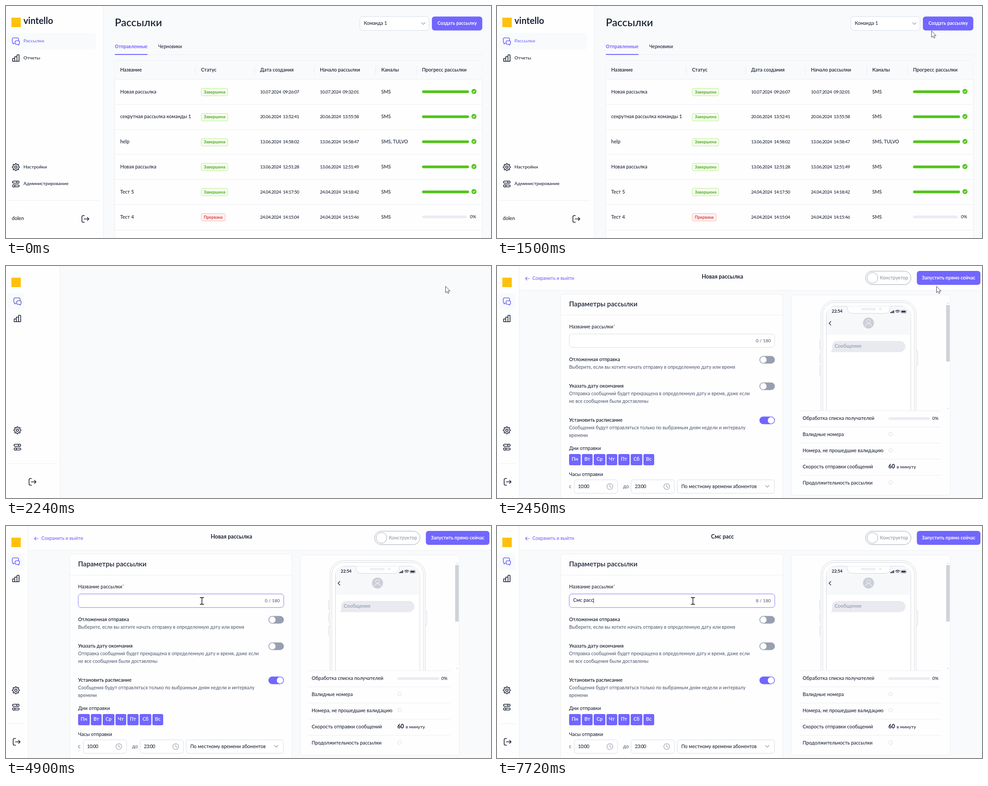
Write an HTML page that moves like this. It is 1083 px wide and 517 px high and loops after 8 s.

```html
<!DOCTYPE html>
<html lang="ru">
<head>
<meta charset="utf-8">
<title>Рассылки</title>
<style>
html, body { margin: 0; width: 100%; height: 100%; overflow: hidden; background: #f9fafc; }
svg { display: block; width: 1083px; height: 517px; }
text { font-family: Lato, "Open Sans", sans-serif; white-space: pre; }
.date { letter-spacing: -.45px; word-spacing: 2px; }
</style>
</head>
<body>
<svg id="stage" viewBox="0 0 1083 517" xmlns="http://www.w3.org/2000/svg"></svg>
<script>
const INK = '#1b2335', SOFT = '#566075', GREY = '#959db0', LINE = '#eceef2', EDGE = '#d7dce5';
const VIOLET = '#7166ff', PALE = '#f8fafc', GREEN = '#52c41a', GOLD = '#ffc10e';

// Drawing helpers: every one returns SVG markup
const text = (x, y, s, { size = 11, w = 500, c = INK, a = 'start', id = '', cls = '' } = {}) =>
  `<text ${id && `id="${id}"`} class="${cls}" x="${x}" y="${y}" font-size="${size}" font-weight="${w}" fill="${c}" text-anchor="${a}">${s}</text>`;
const rect = (x, y, w, h, r = 0, fill = 'none', stroke = 'none', id = '') =>
  `<rect ${id && `id="${id}"`} x="${x}" y="${y}" width="${w}" height="${h}" rx="${r}" fill="${fill}" stroke="${stroke}"/>`;
const circle = (x, y, r, fill = 'none', stroke = 'none', w = 1) =>
  `<circle cx="${x}" cy="${y}" r="${r}" fill="${fill}" stroke="${stroke}" stroke-width="${w}"/>`;
const path = (d, stroke = INK, w = 1, fill = 'none') =>
  `<path d="${d}" fill="${fill}" stroke="${stroke}" stroke-width="${w}" stroke-linecap="round" stroke-linejoin="round"/>`;
const hline = (x1, x2, y, c = LINE) => `<path d="M${x1} ${y}H${x2}" stroke="${c}"/>`;
const vline = (x, y1, y2, c = LINE) => `<path d="M${x} ${y1}V${y2}" stroke="${c}"/>`;
const group = (x, y, s) => `<g transform="translate(${x} ${y})">${s}</g>`;
const chevron = (x, y) => path(`M${x - 4} ${y - 2}l4 4 4-4`, '#8f97a8', 1.1);

// Icons, centred on the given point
const chat = (x, y, c) => group(x, y,
  path('M-3 4H-5L-6 6V4Q-8 3.600-8-1V-5Q-8-8-5-8H3Q6-8 6-5V-2', c, 1.6) +
  path('M1-1.500H5.500Q8.200-1.500 8.200 1V4Q8.200 6 6.500 6.400V8.200L4 6.500H1Q-1.600 6.500-1.600 4V1Q-1.600-1.500 1-1.500Z', c, 1.6));
const bars = (x, y) => group(x, y, path('M-7.200 7.200V1H-2.500V7.200ZM-2.500 7.200V-3H2.500V7.200ZM2.500 7.200V-6.500Q2.500-7.300 3.300-7.300H6.400Q7.200-7.300 7.200-6.500V7.200Z', INK, 1.6));
const gear = (x, y) => {
  let d = '';
  for (let i = 0; i < 64; i++) {
    const a = i / 64 * Math.PI * 2, r = 6.9 + 1.1 * Math.max(-1, Math.min(1, 2 * Math.cos(8 * a)));
    d += `${i ? 'L' : 'M'}${(r * Math.sin(a)).toFixed(2)} ${(-r * Math.cos(a)).toFixed(2)}`;
  }
  return group(x, y, path(d + 'Z', INK, 1.5) + circle(0, 0, 2.6, 'none', INK, 1.5));
};
const sliders = (x, y) => group(x, y,
  path('M2-1.800H-5Q-7.500-1.800-7.500-4T-5-6.300H2M-2 2.200H5Q7.500 2.200 7.500 4.300T5 6.400H-2', INK, 1.5) +
  circle(4.7, -4, 2.6, 'none', INK, 1.5) + circle(-4.7, 4.3, 2.6, 'none', INK, 1.5));
const logout = (x, y) => group(x, y, path('M-2-7.500H-4.500Q-7.500-7.500-7.500-4.500V4.500Q-7.500 7.500-4.500 7.500H-2M-2.500 0H8M4.500-3.500L8 0L4.500 3.500', INK, 1.6));
const clock = (x, y) => circle(x, y, 6.5, 'none', '#8f97a8', 1.1) + path(`M${x} ${y - 4}V${y}L${x + 3} ${y + 2}`, '#8f97a8', 1.1);
const logo = rect(12, 26, 21, 21, 0, GOLD);

function listView() {
  const item = (y, s, c = INK) => text(39, y, s, { size: 10.4, c });
  let s = rect(0, 0, 217, 517, 0, '#fefefe') + vline(217.5, 0, 517) + logo +
    text(39, 39.5, 'vintello', { size: 20, w: 700 }) +
    rect(3, 60, 198, 37, 5, PALE) + chat(22, 79, VIOLET) + item(81, 'Рассылки', VIOLET) +
    bars(22, 116) + item(118.5, 'Отчеты') + gear(22, 359) + item(361.5, 'Настройки') +
    sliders(22, 396.5) + item(399, 'Администрирование') +
    hline(3, 208, 433.5) + text(13, 476.5, 'dolen') + logout(177, 474.5);
  s += text(243, 45, 'Рассылки', { size: 23.5, w: 600 }) +
    rect(790, 23.5, 154.5, 31, 6, '#fff', EDGE) + text(799, 42, 'Команда 1', { size: 10.5 }) + chevron(932, 39) +
    rect(951, 23.5, 112.5, 31, 6, VIOLET, 'none', 'create') +
    text(1007.5, 41.5, 'Создать рассылку', { size: 10.4, w: 700, c: '#fff', a: 'middle' }) +
    hline(243, 1064, 108.5) + rect(243, 107, 73, 2, 0, VIOLET) +
    text(243, 93.5, 'Отправленные', { size: 10.4, w: 700, c: VIOLET }) + text(340, 93.5, 'Черновики', { size: 10.5 }) +
    rect(243, 121.5, 820.5, 420, 7, '#fefefe', LINE) +
    `<path d="M243.500 163V129q0-7 7-7h806q7 0 7 7V163z" fill="${PALE}"/>`;
  const cols = [255, 435.5, 567.5, 701, 838, 929];
  ['Название', 'Статус', 'Дата создания', 'Начало рассылки', 'Каналы', 'Прогресс рассылки']
    .forEach((h, i) => s += text(cols[i], 145.5, h, { w: 600 }));
  [422.5, 555.5, 688.5, 825.5, 916.5].forEach(x => s += vline(x, 134, 152, '#e6e9ee'));
  const rows = [
    ['Новая рассылка', '10.07.2024 09:26:07', '10.07.2024 09:32:01', 'SMS'],
    ['секрутная рассылка команды 1', '20.06.2024 13:52:41', '20.06.2024 13:55:58', 'SMS'],
    ['help', '13.06.2024 14:58:02', '13.06.2024 14:58:47', 'SMS, TULVO'],
    ['Новая рассылка', '13.06.2024 12:51:28', '13.06.2024 12:51:49', 'SMS'],
    ['Тест 5', '24.04.2024 14:17:50', '24.04.2024 14:18:42', 'SMS'],
    ['Тест 4', '24.04.2024 14:15:04', '24.04.2024 14:15:46', 'SMS']
  ];
  const date = { size: 10, cls: 'date' };
  rows.forEach(([name, made, start, via], i) => {
    const y = 191 + 55.8 * i, done = i < 5, b = y + 3.5, top = Math.round(y - 8) + .5;
    s += hline(243, 1064, Math.round(y - 28) + .5) +
      text(255, b, name, { size: 10.9 }) + text(567.5, b, made, date) + text(701, b, start, date) + text(838, b, via, { size: 10.5 }) +
      rect(436, top, done ? 59 : 53.5, 16.5, 3, done ? '#f6ffed' : '#fff1f0', done ? '#b7eb8f' : '#ffb3ad') +
      text(441.5, b, done ? 'Завершена' : 'Прервана', { size: 9.5, w: 600, c: done ? '#389e0d' : '#cf2a32' }) +
      rect(929, y - 3, done ? 105 : 100, 6, 3, done ? GREEN : '#ebecf3') +
      (done ? circle(1045, y - .7, 5.6, GREEN) + path(`M1042.600 ${y - .6}l1.800 1.800 3-3.600`, '#fff', 1.2)
            : text(1036, y + 2.5, '0%', { size: 10 }));
  });
  return s + hline(243, 1064, 499.5);
}

// Narrow menu; dx shifts the icons while the menu is still closing
const menu = (w, dx, out, c) =>
  rect(0, 0, w, 517, 0, '#fefefe') + vline(w + .5, 0, 517) + logo + rect(3, 60, 38, 37, 5, PALE) +
  chat(22 + dx, 79, c) + bars(22 + dx, 117) + gear(22 + dx, 366) + sliders(22 + dx, 403.5) +
  hline(3, w - 8, 440.5) + logout(out, 481);

function phone() {
  const c = '#d3d6de';
  let s = '';
  [165, 194, 222].forEach(y => s += rect(720.5, y + .5, 4, 21, 2, '#fff', c));
  s += rect(935.5, 188.5, 4, 33, 2, '#fff', c) +
    rect(723.5, 77.5, 212.5, 300, 30, '#fff', c) + rect(727.5, 81.5, 204.5, 300, 26, '#fff', c) +
    rect(735.5, 89.5, 188.5, 300, 20, '#fff', c) +
    '<path d="M736 153.500V109q0-19 19-19h150q18.500 0 18.500 19V153.500z" fill="#f7f8fa"/>' +
    path('M778 89.500q4 0 4 4q0 12 12 12h72q12 0 12-12q0-4 4-4', c, 1, '#fff') +
    rect(813.5, 94.5, 31, 3, 1.5, '#fff', c) + circle(856, 95.5, 2, '#fff', c);
  [0, 1, 2, 3].forEach(i => s += rect(878 + i * 2.3, 103 - i * 1.4, 1.7, 2 + i * 1.4, .5, INK));
  s += path('M890 100.500q4.500-4 9 0M892 103q2.500-2.200 5 0', INK, 1.4) + rect(901.5, 98.5, 12.5, 6.5, 2, '#fff', '#8b90a0') + rect(903, 100, 9.5, 3.5, 1, INK) +
    text(747.5, 104, '22:54', { w: 700, size: 9.3 }) + path('M745.500 123.500l-4 4 4 4', INK, 1.3) +
    circle(829.5, 127, 12.3, '#cbced6') + circle(829.5, 123.5, 4, 'none', '#f7f8fa', 1.1) + path('M822.500 134q0-5 7-5t7 5', '#f7f8fa', 1.1) +
    '<path d="M744.500 192q4-3 4-8v-4.500q0-12.500 12.500-12.500h138.500a12.500 12.500 0 0 1 0 25z" fill="#e9eaef"/>' +
    text(754, 181.5, 'Сообщение', { w: 600, c: GREY });
  return `<clipPath id="cut"><path d="M658 65H1002V322H658z"/></clipPath><g clip-path="url(#cut)">${s}</g>`;
}

const toggle = (y, on) => rect(586, y - 8.5, 34.5, 17, 8.5, on ? VIOLET : '#989fb1') + circle(on ? 611.8 : 594.8, y, 7.2, '#fff');

function formView() {
  let s = menu(49, 0, 23.5, VIOLET) + rect(50, 0, 1033, 54, 0, '#fefefe') + hline(50, 1083, 54.5) +
    path('M72 28H63.500M67 24.500L63.500 28L67 31.500', VIOLET, 1.1) + text(79, 31, 'Сохранить и выйти', { size: 10.5, c: VIOLET }) +
    text(503.5, 27.5, '', { w: 700, a: 'middle', size: 12.3, id: 'title' }) +
    rect(823, 11.5, 101.5, 30, 15, '#fff', '#a2a9b9') + circle(838.5, 26.5, 12, '#fff', '#a2a9b9') +
    text(855, 29.5, 'Конструктор', { size: 10.5, w: 600, c: GREY }) +
    rect(937.5, 11, 142, 31, 6, VIOLET) + text(1008.5, 29.5, 'Запустить прямо сейчас', { size: 10.6, w: 700, c: '#fff', a: 'middle' });

  s += rect(142.5, 62.5, 496, 480, 6, '#fefefe', LINE) + text(161, 90, 'Параметры рассылки', { size: 15.2, w: 600 }) + hline(143, 638, 109.5) +
    text(161, 139, 'Название рассылки<tspan fill="#ff7a3d">*</tspan>', { size: 10.9 }) +
    rect(159.5, 150, 462, 33, 7, 'none', '#eeecff', 'halo') + rect(161.5, 151.5, 458.5, 30, 6, '#fff', EDGE, 'field') +
    text(170, 169, '', { id: 'value' }) + rect(170, 161, 1, 11, 0, INK, 'none', 'caret') +
    text(611.5, 169.5, '', { size: 10.2, c: SOFT, a: 'end', id: 'count' });
  const block = (y, head, lines, on) => {
    s += text(161, y + 3.5, head, { w: 600 }) + toggle(y + 1, on);
    lines.forEach((l, i) => s += text(161, y + 20.5 + 17 * i, l, { size: 10.5, c: SOFT }));
  };
  block(208, 'Отложенная отправка', ['Выберите, если вы хотите начать отправку в определенную дату или время']);
  block(267, 'Указать дату окончания', ['Отправка сообщений будет прекращена в определенную дату и время, даже если', 'не все сообщения были доставлены']);
  block(343, 'Установить расписание', ['Сообщения будут отправляться только по выбранным дням недели и интервалу', 'времени'], true);
  s += text(161, 409.5, 'Дни отправки');
  let left = 161;
  [['Пн', 26], ['Вт', 24], ['Ср', 26], ['Чт', 24], ['Пт', 25], ['Сб', 26], ['Вс', 24]].forEach(([d, w]) => {
    s += rect(left, 419, w, 25, 3, VIOLET) + text(left + w / 2, 434, d, { c: '#fff', a: 'middle', w: 600 });
    left += w + 2.5;
  });
  s += text(161, 467.5, 'Часы отправки') + text(161, 494.5, 'с', { c: SOFT }) + text(281.5, 494.5, 'до', { c: SOFT });
  [[172.5, '10:00'], [299.5, '23:00']].forEach(([x, v]) =>
    s += rect(x, 476.5, 96.5, 30, 5, '#fff', EDGE) + text(x + 8.5, 494.5, v, { size: 10.5, cls: 'date' }) + clock(x + 79.5, 491.5));
  s += rect(402.5, 476.5, 217, 30, 5, '#fff', EDGE) + text(411.5, 494.5, 'По местному времени абонентов', { size: 10.9 }) + chevron(603.5, 491);

  s += rect(657.5, 64.5, 354.5, 446, 6, '#fefefe', LINE) + phone() +
    rect(1003, 87, 8, 126, 0, '#d0d2d9') +
    '<path d="M1005 84l2-2.500 2 2.500zM1005 316.500l2 2.500 2-2.500z" fill="#d0d2d9"/>';
  ['Обработка списка получателей', 'Валидные номера', 'Номера, не прошедшие валидацию', 'Скорость отправки сообщений', 'Продолжительность рассылки'].forEach((l, i) => {
    const y = 340 + 36 * i;
    s += hline(675, 992, Math.round(y - 18) + .5) + text(682.5, y + 3, l, { size: 10.9 });
    if (i == 0) s += rect(874, y - 3, 93, 6, 3, '#ebecf3') + text(972, y + 2.5, '0%', { size: 10 });
    else if (i == 3) s += text(874, y + 3, '60', { w: 800, size: 12.5 }) + text(892.5, y + 3, 'в минуту', { size: 10.4 });
    else s += circle(879, y - 1.5, 4, 'none', '#dadde4', 1.2);
  });
  return s;
}

const stage = document.getElementById('stage');
stage.innerHTML = rect(0, 0, 1083, 517, 0, '#f9fafc') +
  `<g id="list">${rect(951, 23.5, 112.5, 31, 6, '#e6e5f8', 'none', 'wave')}${listView()}</g>` +
  `<g id="blank">${menu(120, 3.5, 59, '#6f6bc4')}</g><g id="form">${formView()}</g>` +
  `<g id="arrow">${path('M.500.500V14.500L3.600 11.500L5.800 16.200L8.200 15.100L6 10.600H10.300Z', '#30323a', .9, '#fff')}</g>` +
  `<g id="beam">${path('M-4-7.500H-1Q0-7.500 0-6.500V6.500Q0 7.500-1 7.500H-4M4-7.500H1Q0-7.500 0-6.500M0 6.500Q0 7.500 1 7.500H4', '#000', 1.3)}</g>`;
const el = Object.fromEntries([...stage.querySelectorAll('[id]')].map(e => [e.id, e]));

const LOOP = 8000;
// Pointer path: time, x, y
const moves = [
  [70, 1036, 458], [300, 1010, 385], [600, 966, 262], [850, 940, 162], [970, 935, 128], [1200, 944, 92], [1450, 967, 58], [1700, 981, 45],
  [2600, 981, 45], [2720, 950, 50], [2850, 815, 78], [3000, 600, 132], [3120, 470, 162], [3220, 437, 168], [3480, 437, 168], [3510, 437.5, 167]
];
const name = 'Смс расс';
const keys = [5040, 5710, 5850, 6860, 7190, 7330, 7590, 7720];
const BLINK = 530, FOCUS = 3310;

function place(t) {
  const i = moves.findIndex(m => m[0] > t);
  if (i < 0) return moves[moves.length - 1].slice(1);
  const [t0, x0, y0] = moves[i - 1], [t1, x1, y1] = moves[i], k = (t - t0) / (t1 - t0);
  return [x0 + (x1 - x0) * k, y0 + (y1 - y0) * k];
}
const show = (e, on) => e.setAttribute('visibility', on ? 'visible' : 'hidden');
const set = (e, o) => Object.entries(o).forEach(([k, v]) => e.setAttribute(k, v));

function draw(t) {
  show(el.list, t < 2240);
  show(el.blank, t >= 2240 && t < 2450);
  show(el.form, t >= 2450);

  const moving = t >= 70, [x, y] = moving ? place(t) : [0, 0];
  const over = t >= 2450 && x < 620 && y > 151;
  show(el.arrow, moving && !over);
  show(el.beam, over);
  set(over ? el.beam : el.arrow, { transform: `translate(${x} ${y})` });

  el.create.setAttribute('fill', moving && x > 951 && y < 55 ? '#968eff' : VIOLET);
  const g = 3 * Math.max(0, Math.min(1, (t - 1940) / 100));
  set(el.wave, { x: 951 - g, y: 23.5 - g, width: 112.5 + 2 * g, height: 31 + 2 * g, rx: 6 + g });

  const n = keys.filter(k => k <= t).length, word = name.slice(0, n), focus = t >= FOCUS;
  el.value.textContent = word;
  el.title.textContent = word || 'Новая рассылка';
  el.count.textContent = `${n} / 180`;
  el.field.setAttribute('stroke', focus ? '#8d84f6' : over ? '#aaa4f6' : EDGE);
  show(el.halo, focus);
  const since = t - (n ? keys[n - 1] : FOCUS);
  show(el.caret, focus && Math.floor(since / BLINK) % 2 == 0);
  el.caret.setAttribute('x', 170 + (n ? el.value.getComputedTextLength() : 0));
}

function tick() {
  draw(performance.now() % LOOP);
  requestAnimationFrame(tick);
}
tick();
</script>
</body>
</html>
```
